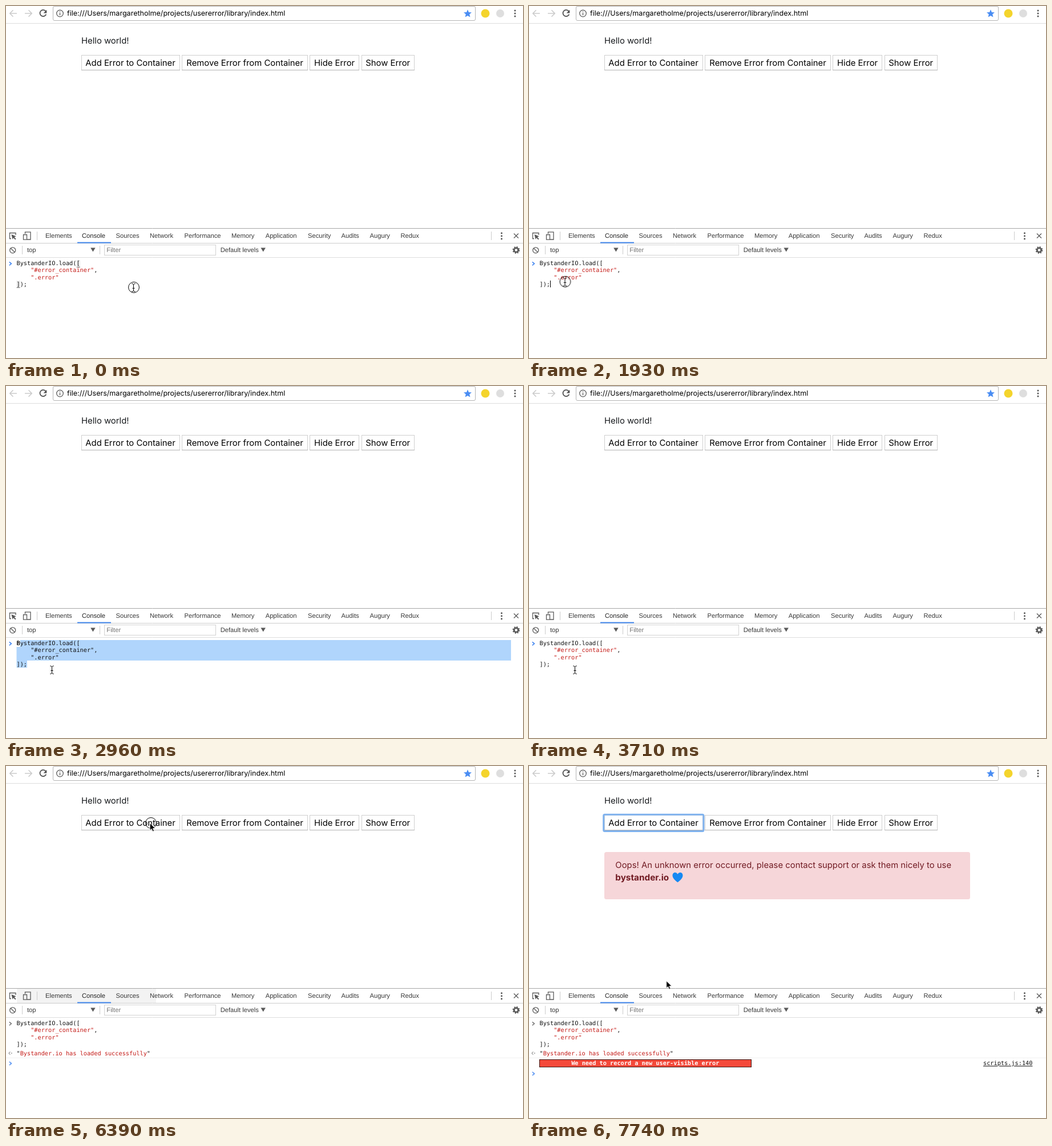
An HTML page for the animation above (8000 ms loop, 906x618 px).

```html
<!DOCTYPE html>
<html lang="en">
<head>
<meta charset="utf-8">
<title>Console demo</title>
<style>
  html, body { margin: 0; width: 100%; height: 100%; overflow: hidden; background: #fff; }
  svg { display: block; width: 906px; height: 618px; }
  text { text-rendering: geometricPrecision; white-space: pre; }

  .page { font: 14.85px Inter, Roboto, sans-serif; fill: #16191c; }
  .page .btn { fill: #000; }
  .url { font: 12.56px Inter, Roboto, sans-serif; fill: #000; }
  .ui { font: 11.2px "Liberation Sans", Arial, sans-serif; fill: #383838; }
  .code { font: 10.26px "DejaVu Sans Mono", monospace; fill: #111; }
  .str { fill: #c41a16; }
  .sel rect { fill: #b0d5fc; }
  .sel text { fill: #111; }
  .line { fill: none; stroke: #5a5a5a; stroke-width: 1.3; }
  .rule { stroke: #ccc; }
  .caret { fill: #000; }

  /* every switch is a hard cut; the pointer moves in equal ticks */
  .cut { animation: 8s step-end infinite; }
  .brackets { animation-name: brackets; }
  .ibeam { animation-name: ibeam; }
  .arrow { animation-name: arrow; }
  .ring { animation-name: ring; }
  .end-caret { animation-name: endCaret; }
  .new-caret { animation-name: newCaret; }
  .row0 { animation-name: row0; }
  .row1 { animation-name: row1; }
  .row2 { animation-name: row2; }
  .tint { animation-name: tint; }
  .loaded { animation-name: loaded; }
  .failed { animation-name: failed; }
  .first { animation-name: first; }
  .next { animation-name: next; }
  .pointer { animation: pointer 8s linear infinite; }

  @keyframes brackets { 0% { opacity: 1 } 18.6%, to { opacity: 0 } }
  @keyframes ibeam { 0% { opacity: 1 } 57.4%, to { opacity: 0 } }
  @keyframes arrow { 0% { opacity: 0 } 57.4%, to { opacity: 1 } }
  @keyframes ring {
    0%, 14.8%, 63.05%, 76.1% { opacity: 1 }
    1.87%, 33.3%, 66.8%, 81.7%, to { opacity: 0 }
  }
  @keyframes endCaret {
    0%, 25.9%, 46.3%, to { opacity: 0 }
    18.6%, 40.7% { opacity: 1 }
  }
  @keyframes newCaret { 0%, 55.6%, to { opacity: 0 } 50% { opacity: 1 } }
  @keyframes row0 { 0%, 40.7%, to { opacity: 0 } 29.6% { opacity: 1 } }
  @keyframes row1 { 0%, 40.7%, to { opacity: 0 } 27.7% { opacity: 1 } }
  @keyframes row2 { 0%, 40.7%, to { opacity: 0 } 25.9% { opacity: 1 } }
  @keyframes tint { 0%, 81.7%, to { opacity: 0 } 61.2% { opacity: 1 } }
  @keyframes loaded { 0% { opacity: 0 } 48.15%, to { opacity: 1 } }
  @keyframes failed { 0% { opacity: 0 } 81.7%, to { opacity: 1 } }
  @keyframes first { 0% { stroke: #3b82f0 } 48.15%, to { stroke: #777 } }
  @keyframes next { 0% { transform: none } 81.7%, to { transform: translateY(18px) } }
  @keyframes pointer {
    0% { transform: translate(224px, 494px); animation-timing-function: steps(5) }
    9.3% { transform: translate(140px, 536px); animation-timing-function: steps(3) }
    14.8%, 16.7% { transform: translate(81px, 505px); animation-timing-function: steps(4) }
    24.1% { transform: translate(63.5px, 484px); animation-timing-function: steps(3) }
    29.6%, 31.45% { transform: translate(25px, 450px); animation-timing-function: steps(3) }
    36.95%, 53.8% { transform: translate(81px, 498px); animation-timing-function: steps(5) }
    63.05%, 66.8% { transform: translate(253px, 260px); animation-timing-function: steps(3) }
    72.35% { transform: translate(254px, 91px); animation-timing-function: step-end }
    76.1%, 91.2% { transform: translate(254px, 100px); animation-timing-function: steps(3) }
    96.7%, to { transform: translate(242.5px, 377px) }
  }
</style>
</head>
<body>
<svg viewBox="0 0 906 618">
  <defs>
    <path id="chevron" d="M0 -3 L3.6 0 L0 3" fill="none" stroke-width="1.5"/>
    <g id="dots" fill="#555"><circle cy="-5" r="1.5"/><circle r="1.5"/><circle cy="5" r="1.5"/></g>
    <path id="drop" d="M0 0 h8.4 l-4.2 7 z" fill="#5a5a5a"/>
    <path id="back" d="M13 0 H1 M6.5 -5.7 L.8 0 L6.5 5.7" fill="none" stroke="#cbcbcb" stroke-width="1.6"/>
  </defs>

  <!-- address bar -->
  <use href="#back" x="6" y="13"/>
  <use href="#back" transform="translate(46 13) scale(-1 1)"/>
  <path d="M69.5 9 A5.6 5.6 0 1 0 70.3 14.6" fill="none" stroke="#505050" stroke-width="1.8"/>
  <path d="M71.3 6.8 v5.6 h-5.6 z" fill="#505050"/>
  <rect x="82.5" y=".5" width="740" height="25" rx="2.5" fill="#fff" stroke="#b4b4b4"/>
  <circle cx="94.5" cy="13" r="5.8" class="line"/>
  <path d="M94.5 12 v4.2 M94.5 9.2 v1.6" class="line"/>
  <text class="url" x="107" y="17.4">file:///Users/margaretholme/projects/usererror/library/index.html</text>
  <path d="M809 6.2 l2 4.7 5 .4 -3.8 3.3 1.2 5 -4.4 -2.7 -4.4 2.7 1.2 -5 -3.8 -3.3 5 -.4 z" fill="#4a8df3"/>
  <circle cx="840" cy="13" r="7.5" fill="#f4d42c"/>
  <circle cx="866" cy="13" r="7" fill="#dedede"/>
  <use href="#dots" x="892" y="13"/>
  <path d="M0 30.5 H906" stroke="#dcdcdc"/>

  <!-- page -->
  <g class="page">
    <text x="132" y="66.2">Hello world!</text>
    <g fill="#fff" stroke="#cfcfcf">
      <rect x="132.5" y="86.5" width="172" height="26"/>
      <rect x="308.5" y="86.5" width="220" height="26"/>
      <rect x="532.5" y="86.5" width="86" height="26"/>
      <rect x="623.5" y="86.5" width="92" height="26"/>
      <path d="M132 112.5 h173 M308 112.5 h221 M532 112.5 h87 M623 112.5 h93" stroke="#b3b3b3"/>
    </g>
    <rect class="cut failed" x="130.7" y="85.2" width="175.2" height="29.2" rx="2" fill="none" stroke="#7fb2ee" stroke-width="3"/>
    <g class="btn">
      <text x="139.3" y="105.2">Add Error to Container</text>
      <text x="316.3" y="105.2">Remove Error from Container</text>
      <text x="540" y="105.2">Hide Error</text>
      <text x="630.3" y="105.2">Show Error</text>
    </g>
    <g class="cut failed" fill="#721c24">
      <rect x="132" y="151" width="641" height="83" rx="3.5" fill="#f6d6d9"/>
      <text x="151.3" y="179.3">Oops! An unknown error occurred, please contact support or ask them nicely to use</text>
      <text x="151.3" y="201.4" font-weight="700" font-size="15.3">bystander.io</text>
      <path d="M260.5 204.3 C255 200 251.5 196.5 251.5 192.2 C251.5 186.3 258.3 185.3 260.5 190 C262.7 185.3 269.5 186.3 269.5 192.2 C269.5 196.5 266 200 260.5 204.3 Z" fill="#1689f2"/>
    </g>
  </g>

  <!-- panel tabs -->
  <rect class="cut tint" x="19" y="391" width="244" height="25" fill="#f3f3f3"/>
  <path d="M0 390.5 H906" stroke="#a6a6a6"/>
  <path d="M0 416.5 H906" class="rule"/>
  <path d="M0 441.5 H906" stroke="#dedede"/>
  <path d="M125 415.5 h59" stroke="#4288ee" stroke-width="2"/>
  <path d="M17 402 V398.5 H6.5 V408.5 H9" class="line"/>
  <path d="M9.5 401 l8.3 3.5 -3.2 1.2 3 3.3 -1.5 1.3 -3 -3.3 -1.6 2.8 z" fill="#555"/>
  <path d="M33.5 400 V396.8 H43 V410 H37 M30.5 401.5 h6 v8.7 h-6 z" class="line"/>
  <path d="M54.5 396 v15 M850.5 396 v15 M28.5 421 v15 M164.5 421 v15" class="rule"/>
  <g class="ui">
    <text x="69" y="407.2">Elements</text>
    <text x="133" y="407.2" fill="#222">Console</text>
    <text x="192.5" y="407.2">Sources</text>
    <text x="252" y="407.2">Network</text>
    <text x="312.5" y="407.2">Performance</text>
    <text x="395" y="407.2">Memory</text>
    <text x="454.7" y="407.2">Application</text>
    <text x="529" y="407.2">Security</text>
    <text x="587.5" y="407.2">Audits</text>
    <text x="637.5" y="407.2">Augury</text>
    <text x="691.5" y="407.2">Redux</text>
  </g>
  <use href="#dots" x="868.5" y="403.8"/>
  <path d="M890 399.5 l8 8 M898 399.5 l-8 8" class="line"/>

  <!-- console toolbar -->
  <circle cx="11.7" cy="428.8" r="5" class="line"/>
  <path d="M8.2 425.3 l7 7" class="line"/>
  <rect x="172.5" y="419.5" width="195" height="18" fill="#fff" stroke="#d2d2d2"/>
  <g class="ui">
    <text x="37" y="432.3">top</text>
    <text x="176.3" y="432.3" fill="#757575">Filter</text>
    <text x="375.7" y="432.3">Default levels</text>
  </g>
  <use href="#drop" x="148.2" y="424.5"/>
  <use href="#drop" x="446.5" y="424.5"/>
  <g fill="none" stroke="#5a5a5a">
    <circle cx="894" cy="428.5" r="3.7" stroke-width="2.8"/>
    <circle cx="894" cy="428.5" r="5.5" stroke-width="1.9" stroke-dasharray="2.16"/>
  </g>

  <!-- console -->
  <use class="cut first" href="#chevron" x="5.8" y="452.3"/>
  <g class="cut brackets">
    <path d="M123.7 446 h6.2 v12 h-6.2 z M18.5 482 h6.2 v12 h-6.2 z" fill="#ececec"/>
    <path d="M123.7 458.5 h6.2 M18.5 494.5 h6.2" stroke="#777"/>
  </g>
  <g class="code">
    <text x="18.5" y="455.3">BystanderIO.load([</text>
    <text x="43.2" y="467.4"><tspan class="str">"#error_container"</tspan>,</text>
    <text x="43.2" y="479.5" class="str">".error"</text>
    <text x="18.5" y="491.6">]);</text>

    <g class="sel cut row0">
      <rect x="24.7" y="446" width="860.3" height="12"/>
      <text x="18.5" y="455.3">BystanderIO.load([</text>
    </g>
    <g class="sel cut row1">
      <rect x="18.5" y="458" width="866.5" height="12"/>
      <text x="43.2" y="467.4">"#error_container",</text>
    </g>
    <g class="sel cut row2">
      <rect x="18.5" y="470" width="866.5" height="12"/>
      <rect x="18.5" y="482" width="18.5" height="12.5"/>
      <text x="43.2" y="479.5">".error"</text>
      <text x="18.5" y="491.6">]);</text>
    </g>
    <rect class="caret cut end-caret" x="37" y="482" width="1" height="12"/>

    <g class="cut loaded">
      <path d="M7.5 501.7 L5 504.3 L7.5 506.9" fill="none" stroke="#999" stroke-width="1.2"/>
      <circle cx="9.8" cy="504.3" r="1" fill="#999"/>
      <text x="18.5" y="507.6">"<tspan class="str">Bystander.io has loaded successfully</tspan>"</text>
      <path d="M0 512.5 H906" stroke="#f0f0f0"/>
      <use class="cut next" href="#chevron" x="5.8" y="522.2" stroke="#3b82f0"/>
    </g>
    <rect class="caret cut new-caret" x="19" y="516" width="1" height="12"/>

    <g class="cut failed">
      <rect x="18.5" y="515.5" width="371" height="13" fill="#f4493a" stroke="#3a1a18"/>
      <text x="74.2" y="525.4" font-weight="700" fill="#fff">We need to record a new user-visible error</text>
      <text x="796" y="525.4" text-decoration="underline">scripts.js:140</text>
    </g>
  </g>

  <!-- mouse -->
  <g class="pointer">
    <circle class="cut ring" r="9.4" fill="none" stroke="#000"/>
    <path class="cut ibeam" d="M-3.7 -6.5 q2.7 0 3.2 1.5 q.5 -1.5 3.2 -1.5 M-3.7 7.5 q2.7 0 3.2 -1.5 q.5 1.5 3.2 1.5 M-.5 -5 V6 M-2.5 1.5 h4" fill="none" stroke="#000"/>
    <path class="cut arrow" d="M-1.8 .3 V13 L1.2 10.3 L3.2 15 L5.4 14 L3.5 9.5 H7.5 Z" fill="#000" stroke="#fff" stroke-width=".8"/>
  </g>
</svg>
</body>
</html>
```
